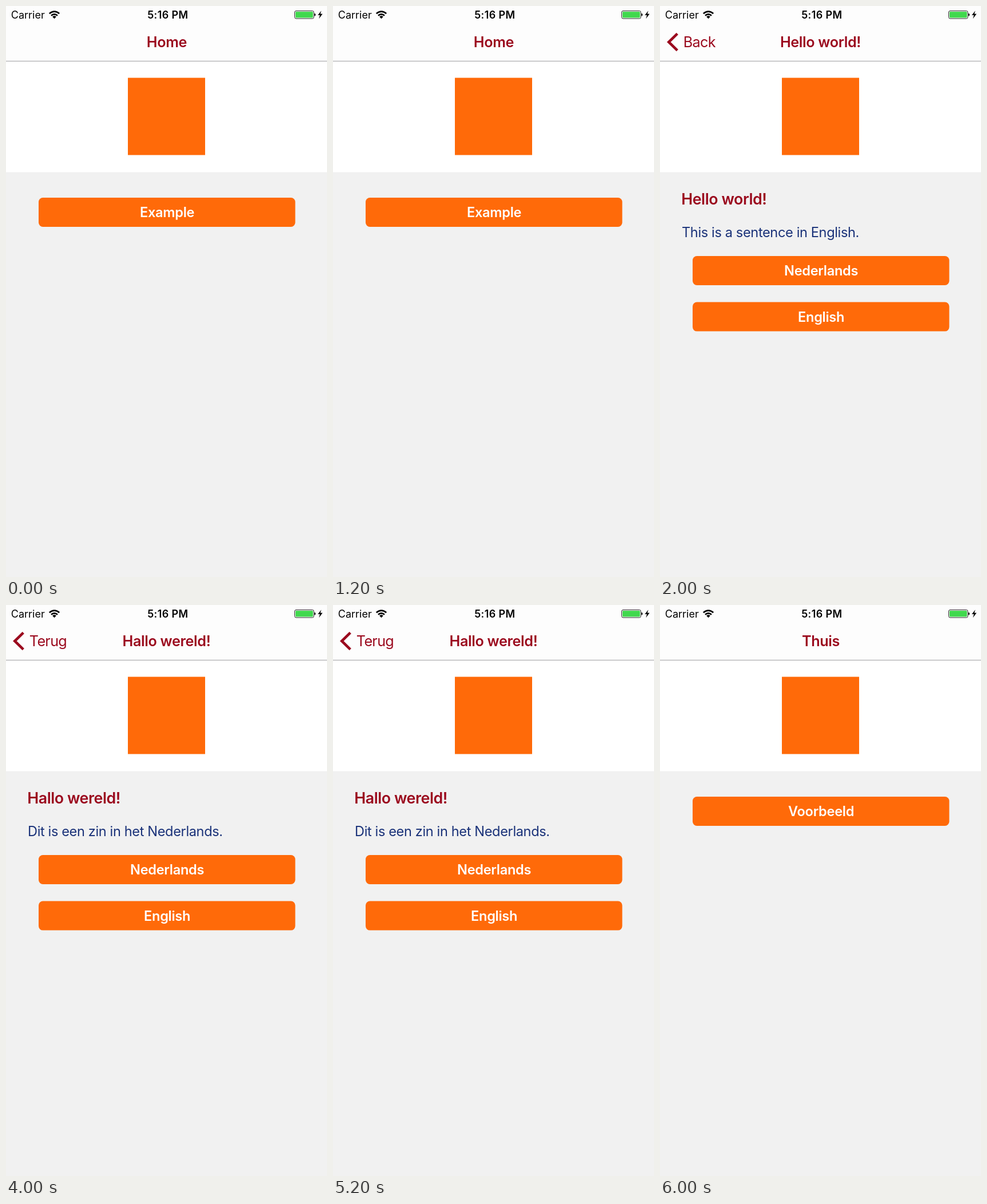
An HTML page that plays this animation: 561 by 998 pixels, repeating every 8000 ms.

```html
<!DOCTYPE html>
<html lang="en">
<head>
<meta charset="utf-8">
<title>Language switch</title>
<style>
  html, body { margin: 0; width: 100%; height: 100%; overflow: hidden; background: #f1f1f1; }
  svg { display: block; width: 100vw; height: 100vh; }
  text { font-family: Inter, Roboto, sans-serif; }
  .status { font-size: 18px; fill: #000; }
  .time { font-weight: 600; letter-spacing: .35px; }
  .mid { text-anchor: middle; }
  .red { fill: #9b0a1e; }
  .title { font-size: 25.2px; font-weight: 600; letter-spacing: -.35px; }
  .back { font-size: 25.2px; letter-spacing: -.7px; }
  .head { font-size: 26.8px; font-weight: 600; letter-spacing: -.45px; }
  .line { font-size: 23.6px; letter-spacing: -.38px; fill: #1a3279; }
  .label { font-size: 23.6px; font-weight: 600; letter-spacing: -.3px; fill: #fff; }
</style>
</head>
<body>
<svg viewBox="0 0 561 998">
  <rect width="561" height="96" fill="#fdfdfd"/>
  <rect y="97" width="561" height="193.5" fill="#fff"/>
  <rect y="95.7" width="561" height="1.5" fill="#b9b9bb"/>
  <rect x="213" y="125.5" width="135" height="135" fill="#ff6a09"/>

  <text class="status" x="8.8" y="22">Carrier</text>
  <g fill="none" stroke="#000" stroke-width="2.7">
    <path d="M75.8 13.3Q84.5 5.8 93.2 13.3"/>
    <path d="M79 16.7Q84.5 12 90 16.7"/>
  </g>
  <path d="M84.5 22.2L81.2 18.7Q84.5 16 87.8 18.7Z"/>
  <text class="status time mid" x="282.8" y="22">5:16 PM</text>
  <rect x="504.5" y="8.5" width="33.5" height="13.5" rx="2.5" fill="#fff" stroke="#222"/>
  <rect x="506" y="10" width="30.5" height="10.5" rx="1.2" fill="#40d84d"/>
  <path d="M539 12.8Q541 13 541 15.3T539 17.8Z"/>
  <path d="M551 8.2L545 16H548.6L546.9 22.2L553.2 13.8H549.4Z"/>

  <g id="view"></g>
</svg>
<script>
  const view = document.getElementById("view");

  const text = (style, x, y, words) => `<text class="${style}" x="${x}" y="${y}">${words}</text>`;

  const button = (y, words) =>
    `<rect x="57" y="${y}" width="448.5" height="51" rx="7.5" fill="#ff6a09"/>` +
    text("label mid", 281.6, y + 34, words);

  const home = (title, label) => text("title red mid", 281, 72, title) + button(335, label);

  const detail = (back, title, line) =>
    `<path d="M30.3 48.3L15.3 63L30.3 77.7" fill="none" stroke="#9b0a1e" stroke-width="4.6"/>` +
    text("back red", 40.8, 72, back) +
    text("title red mid", 280.5, 72, title) +
    text("head red", 37.2, 346.5, title) +
    text("line", 38, 403.5, line) +
    button(437, "Nederlands") +
    button(517.6, "English");

  const screens = [
    home("Home", "Example"),
    detail("Back", "Hello world!", "This is a sentence in English."),
    detail("Terug", "Hallo wereld!", "Dit is een zin in het Nederlands."),
    home("Thuis", "Voorbeeld")
  ];

  const start = performance.now();
  let shown = -1;

  function draw(now) {
    const index = Math.floor(Math.max(0, now - start) / 2000) % screens.length;
    if (index !== shown) view.innerHTML = screens[shown = index];
    requestAnimationFrame(draw);
  }
  draw(start);
</script>
</body>
</html>
```
